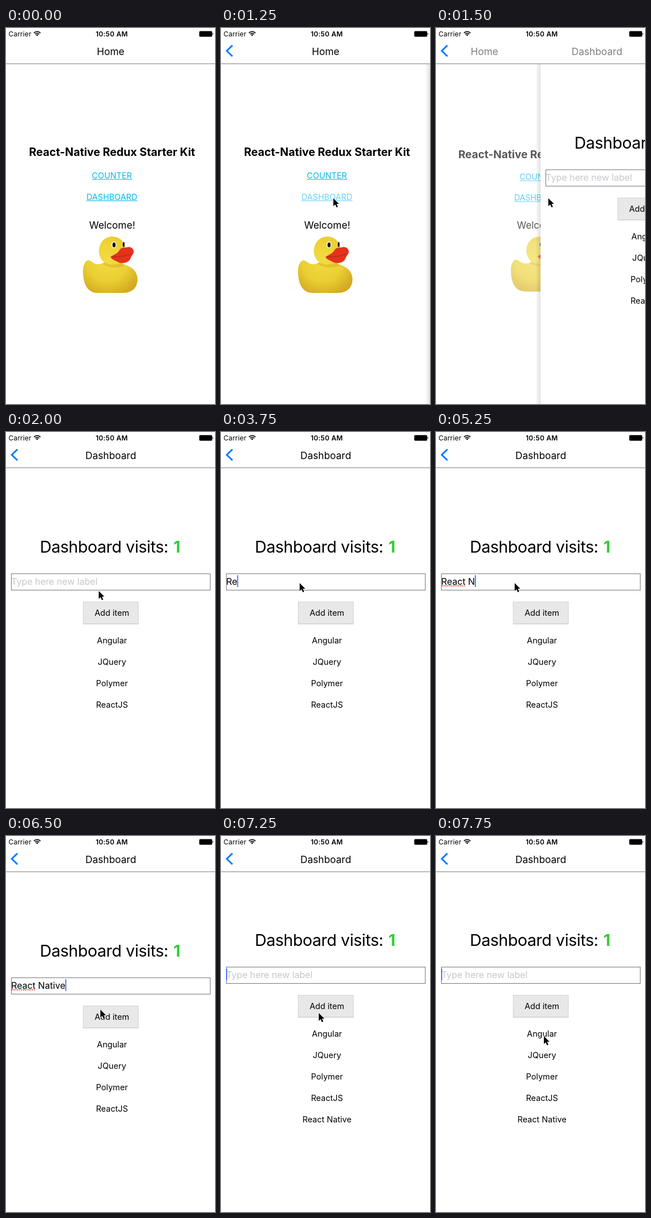
Animation of 372 by 667 pixels, one loop 8 s. Source, as an HTML page:

```html
<!DOCTYPE html>
<html lang="en">
<head>
<meta charset="utf-8">
<title>Starter kit demo</title>
<style>
  html, body { margin: 0; width: 100%; height: 100%; overflow: hidden; background: #fff; }
  svg { display: block; width: 100%; height: 100%; font-family: Inter, Roboto, sans-serif; }
  text { white-space: pre; }
  .mid { text-anchor: middle; }
  .title { font-size: 17.5px; }
  .item { font-size: 14.6px; }
  .field { font-size: 16.15px; }
  .link { fill: #00b7f4; stroke: none; }
</style>
</head>
<body>
<svg viewBox="0 0 372 667">
  <defs>
    <linearGradient id="shade">
      <stop offset="0" stop-color="#000" stop-opacity="0"/>
      <stop offset="1" stop-color="#000" stop-opacity=".12"/>
    </linearGradient>
    <radialGradient id="skin" cx=".45" cy=".4" r=".7">
      <stop offset="0" stop-color="#f3dc42"/>
      <stop offset=".55" stop-color="#ebcf33"/>
      <stop offset="1" stop-color="#d0a620"/>
    </radialGradient>
  </defs>
  <rect width="372" height="667" fill="#fff"/>

  <g id="home">
    <rect y="64" width="372" height="603" fill="#fff"/>
    <text class="mid" x="188.8" y="227.3" font-size="19.8" font-weight="700">React-Native Redux Starter Kit</text>
    <g class="link">
      <text class="mid item" x="188.5" y="266.5">COUNTER</text>
      <rect x="153" y="268" width="71.5" height="1"/>
    </g>
    <g class="link" id="dashLink">
      <text class="mid item" x="188.5" y="304.5">DASHBOARD</text>
      <rect x="143" y="306" width="91" height="1"/>
    </g>
    <text class="mid title" x="189" y="355.8">Welcome!</text>
    <path fill="url(#skin)" d="M137 431C137 423 140 414 146 412C151 412 155 418 162 419C168 419 172 418 175 416C166 409 163 396 167 386C171 375 180 370 189 370C202 370 211 379 212 391C213 401 210 409 206 415C208 420 215 420 221 424C230 429 234 437 234 446C234 459 226 470 207 470H163C146 470 137 455 137 431Z"/>
    <path fill="#c99c18" opacity=".35" d="M175 416C184 421 197 421 206 415C207 419 210 420 212 421C201 427 184 426 170 418Z"/>
    <path fill="#e3331d" d="M186 406C192 402 199 400 202 394C206 388 213 390 216 389C223 387 229 393 227 399C226 402 223 404 222 408C219 417 206 419 199 415C194 412 188 411 186 406Z"/>
    <path fill="none" stroke="#b91f10" stroke-width="1.3" d="M189 406C201 406 212 405 224 401"/>
    <ellipse cx="192" cy="384.500" rx="4.500" ry="6" fill="#f4f0dc"/>
    <ellipse cx="192.300" cy="384.800" rx="2.800" ry="4.300" fill="#151515"/>
    <ellipse cx="209.500" cy="384" rx="1.700" ry="4.500" fill="#151515"/>
  </g>

  <g id="dash">
    <rect x="-9" y="64" width="9" height="603" fill="url(#shade)"/>
    <rect y="64" width="372" height="603" fill="#fff"/>
    <g id="content">
      <text x="60.200" y="213.500" font-size="28.900" letter-spacing="-.4">Dashboard visits:</text>
      <text x="298" y="213.500" font-size="28.900" font-weight="700" fill="#32cd32">1</text>
      <rect x="9.500" y="251.500" width="354" height="29" fill="#fff" stroke="#777"/>
      <rect id="mark" x="8" y="252" height="24" fill="#cddcee"/>
      <text id="hint" class="field" x="9.300" y="270.800" fill="#c7c7cd">Type here new label</text>
      <text id="typed" class="field" x="9.300" y="270.800"></text>
      <path id="misspelt" d="M11 272.900H52" stroke="#f2443c" stroke-width="2.200" stroke-linecap="round" stroke-dasharray="0 3.300"/>
      <rect id="caret" y="254" width="1.800" height="21" fill="#426bf2"/>
      <g id="button">
        <rect x="137.500" y="301.500" width="98" height="39" fill="#e8e8e8" stroke="#d2d2d2"/>
        <path d="M137 340.500H236" stroke="#c2c2c2"/>
        <text class="mid item" x="188.500" y="326.200">Add item</text>
      </g>
      <g id="list"></g>
      <g id="popup">
        <path d="M6.500 276.500H60A12.500 12.500 0 0 1 60 301.500H6.500Z" fill="#fff" stroke="#d0d0d0"/>
        <text class="field" x="8.500" y="295" fill="#1a72dc">Rwać</text>
        <path d="M55.500 285.500L62.500 292.500M62.500 285.500L55.500 292.500" stroke="#bbb" stroke-width="1.200"/>
      </g>
    </g>
  </g>

  <rect width="372" height="63" fill="#fff"/>
  <path d="M0 63.500H372" stroke="#808083"/>
  <text id="homeTitle" class="mid title" x="186.300" y="47.800">Home</text>
  <text id="dashTitle" class="mid title" x="186.500" y="47.800">Dashboard</text>
  <path id="back" d="M20.300 30.700L10.300 40.500L20.300 50.300" fill="none" stroke="#007aff" stroke-width="3"/>

  <text x="4.500" y="14.700" font-size="12" letter-spacing=".2">Carrier</text>
  <g fill="none" stroke="#000" stroke-width="1.700">
    <path d="M49.700 8.800A8.200 8.200 0 0 1 61.300 8.800"/>
    <path d="M51.900 11.200A5 5 0 0 1 59.100 11.200"/>
    <path d="M55.500 14.500L53.600 12.500A2.700 2.700 0 0 1 57.400 12.500Z" fill="#000" stroke="none"/>
  </g>
  <text class="mid" x="188.300" y="14.700" font-size="12" font-weight="600" letter-spacing=".3">10:50 AM</text>
  <rect x="344" y="5.500" width="23" height="10" rx="1.800"/>
  <path d="M367.700 8.500Q370 10.500 367.700 12.500Z"/>

  <path id="cursor" d="M0 0V14L3.300 11L5.700 16.300L8 15.300L5.700 10.100H10Z" stroke="#fff" stroke-width="1.100" paint-order="stroke"/>
</svg>
<script>
const LOOP = 8000, TICK = 250;
const OPEN = 1250, SLIDE = 500, FOCUS = 2500, ADD = 7000;
const $ = id => document.getElementById(id);

// time, x, y of the pointer tip
const path = [
  [250, 262, 14], [500, 222, 190], [750, 203, 290], [1000, 200, 302], [1500, 200, 302],
  [2000, 165, 282], [2250, 146, 271], [2500, 140, 268], [6250, 140, 268], [6500, 168, 308],
  [7000, 168, 308], [7250, 174, 314], [7500, 188, 342], [7750, 192, 355]
];

// time, number of characters entered
const phrase = "React Native";
const keys = [[3750, 2], [4000, 3], [4250, 4], [4750, 5], [5000, 6], [5250, 7], [5500, 9], [5750, 10], [6000, 12]];

const items = ["Angular", "JQuery", "Polymer", "ReactJS", phrase].map((name, i) => {
  const el = document.createElementNS("http://www.w3.org/2000/svg", "text");
  el.setAttribute("class", "mid item");
  el.setAttribute("x", 188.6);
  el.setAttribute("y", 375.2 + 38 * i);
  el.textContent = name;
  return $("list").appendChild(el);
});

const set = (id, name, value) => $(id).setAttribute(name, value);
const show = (el, on) => el.setAttribute("display", on ? "inline" : "none");
const between = (t, a, b) => t >= a && t < b;
const clamp = v => Math.max(0, Math.min(1, v));
const ease = v => v * v * (3 - 2 * v);

function pointer(t) {
  let i = 0;
  while (i < path.length - 2 && t >= path[i + 1][0]) i++;
  const [a, x, y] = path[i], [b, u, v] = path[i + 1];
  const k = clamp((t - a) / (b - a));
  return [x + (u - x) * k, y + (v - y) * k];
}

function drawScreens(t) {
  const p = ease(clamp((t - OPEN) / SLIDE));
  const s = 1 - .05 * p;
  show($("home"), p < 1);
  set("home", "opacity", 1 - .7 * p);
  set("home", "transform", `translate(${186 - 10 * p} 365) scale(${s}) translate(-186 -365)`);
  set("dashLink", "opacity", between(t, 1000, 1250) ? .2 : between(t, 1250, 1500) ? .6 : 1);
  show($("dash"), t >= OPEN);
  set("dash", "transform", `translate(${372 * (1 - p)} 0)`);
  show($("back"), t >= OPEN);
  set("homeTitle", "opacity", 1 - p);
  set("homeTitle", "transform", `translate(${-200 * p} 0)`);
  set("dashTitle", "opacity", p);
  set("dashTitle", "transform", `translate(${200 * (1 - p)} 0)`);
}

function drawForm(t) {
  const added = t >= ADD;
  const count = added ? 0 : keys.reduce((n, [at, c]) => t >= at ? c : n, 0);
  const suggest = between(t, 4500, 4750);
  $("typed").textContent = phrase.slice(0, count);
  const end = 9.3 + (count ? $("typed").getComputedTextLength() : 0);
  show($("hint"), !count);
  show($("mark"), suggest);
  set("mark", "width", end - 8);
  show($("popup"), suggest);
  show($("misspelt"), count > 5);
  show($("caret"), t >= FOCUS && !between(t, 3000, 3750) && !between(t, 7500, 7750));
  set("caret", "x", end - .2);
  set("button", "opacity", between(t, 6750, ADD) ? .5 : 1);
  show(items[4], added);
  set("content", "transform", `translate(0 ${added ? -19 : 0})`);
}

function draw(now) {
  const t = Math.floor(now % LOOP / TICK) * TICK;
  drawScreens(t);
  drawForm(t);
  show($("cursor"), t >= path[0][0]);
  set("cursor", "transform", `translate(${pointer(t)})`);
}

const start = performance.now();
function frame() {
  draw(performance.now() - start);
  requestAnimationFrame(frame);
}
frame();
</script>
</body>
</html>
```
